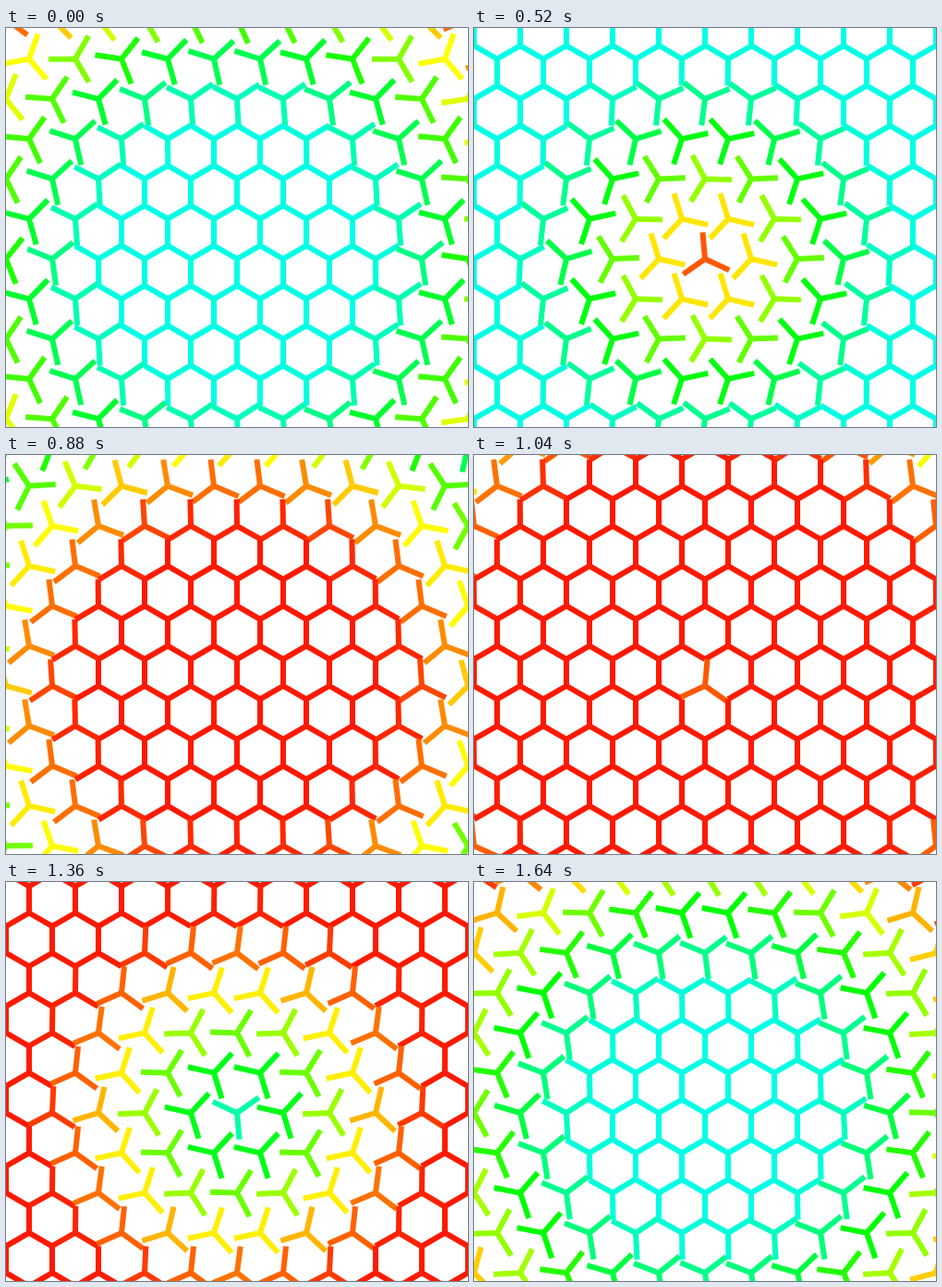
An HTML page with a canvas that plays this animation: 500x432 px, repeating every 1680 ms.

```html
<!DOCTYPE html>
<html lang="en">
<head>
<meta charset="utf-8">
<title>Turning hexagons</title>
<style>
  html, body { margin: 0; width: 100%; height: 100%; overflow: hidden; background: #fff; }
  canvas { display: block; }
</style>
</head>
<body>
<canvas id="stage" width="500" height="432"></canvas>
<script>
const ctx = document.getElementById('stage').getContext('2d');
const W = 500, H = 432;
const LOOP = 1680, HALF = LOOP / 2, STEP = 40;
const START = 110, TURN = 500, LAG = 1.73;   // ms, ms, ms per pixel
const CX = 250, CY = 250, GAP = 50;
const ROW = GAP * Math.sqrt(3) / 2;
const ARM = GAP / Math.sqrt(3), THICK = 6;
const CYAN = 174, RED = 6;                   // hues

const ease = u => u * u * (3 - 2 * u);

// One three-armed star per lattice point, delayed by its distance from the centre.
const stars = [];
for (let j = -7; j <= 5; j++) {
  for (let i = -6; i <= 6; i++) {
    const dx = (i + (j & 1) / 2) * GAP, dy = j * ROW;
    stars.push({ x: CX + dx, y: CY + dy, delay: START + LAG * Math.hypot(dx, dy) });
  }
}

function drawStar({ x, y, delay }, time) {
  const local = time - delay;
  const turns = Math.floor(local / HALF);
  const p = ease(Math.min(1, (local - turns * HALF) / TURN));
  const mix = turns % 2 ? 1 - p : p;
  const angle = Math.PI / 2 + (turns + p) * Math.PI / 3;

  ctx.strokeStyle = `hsl(${CYAN + (RED - CYAN) * mix}, 100%, 50%)`;
  ctx.beginPath();
  for (let k = 0; k < 3; k++) {
    const a = angle + k * Math.PI * 2 / 3;
    ctx.moveTo(x, y);
    ctx.lineTo(x + ARM * Math.cos(a), y + ARM * Math.sin(a));
  }
  ctx.stroke();
}

function draw(time) {
  ctx.fillStyle = '#fff';
  ctx.fillRect(0, 0, W, H);
  ctx.lineWidth = THICK;
  for (const star of stars) drawStar(star, time);
}

const begin = performance.now();
function tick() {
  const t = (performance.now() - begin) % LOOP;
  draw(Math.floor(t / STEP) * STEP);
  requestAnimationFrame(tick);
}
tick();
</script>
</body>
</html>
```
